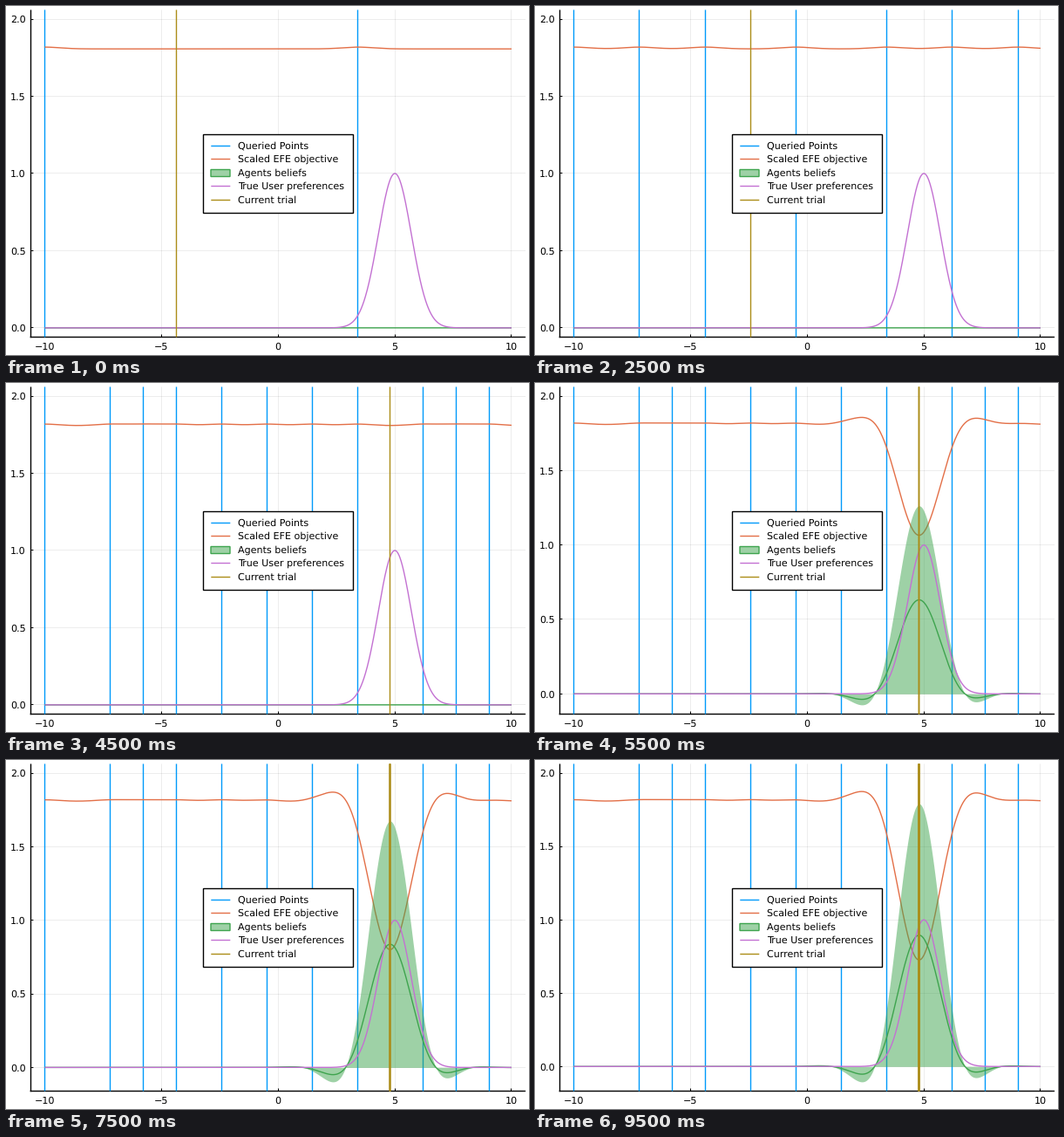
A matplotlib script for the animation above (10000 ms loop, 600 px wide and 400 px high).

```python
import math

import matplotlib.pyplot as plt
import numpy as np
from matplotlib.animation import FuncAnimation
from matplotlib.patches import Rectangle

WIDTH, HEIGHT, DPI = 600, 400, 100
LEFT, RIGHT, TOP, BOTTOM = 28.4, 596.06, 4.44, 379.5
BLUE, ORANGE, GREEN, PURPLE, GOLD = "#009afa", "#e36f47", "#3ea44e", "#c371d2", "#ac8d18"
FRAMES, INTERVAL = 20, 500

plt.rcParams.update({
    "font.family": "DejaVu Sans",
    "font.size": 8.06,
    "path.snap": False,
    "text.hinting": "none",
    "lines.linewidth": 1,
    "lines.solid_capstyle": "butt",
})

# Trial points in the order they are asked; the last one is asked repeatedly.
TRIALS = [-10, 3.41, -4.36, 9.04, -0.475, 6.2, -7.19, -2.415, 1.465, 7.62, -5.775, 4.793]
BEST = len(TRIALS) - 1
xs = np.linspace(-10, 10, 1001)
preference = np.exp(-(xs - 5) ** 2)
normal_cdf = np.vectorize(lambda z: 0.5 * (1 + math.erf(z / math.sqrt(2))))
nodes, weights = np.polynomial.hermite_e.hermegauss(20)
weights = weights / weights.sum()


def kernel(a, b):
    return np.exp(-0.5 * np.subtract.outer(a, b) ** 2)


def entropy(p):
    p = np.clip(p, 1e-9, 1 - 1e-9)
    return -p * np.log(p) - (1 - p) * np.log(1 - p)


def posterior(queried, answers):
    """Gaussian process regression with unit kernel and unit noise."""
    gram = kernel(queried, queried) + np.eye(len(queried))
    cross = kernel(xs, queried)
    gain = np.linalg.solve(gram, cross.T)
    return answers @ gain, 1 - np.sum(cross.T * gain, axis=0)


def efe_objective(mean, var):
    p = normal_cdf(mean / np.sqrt(1 + var))
    samples = normal_cdf(mean[:, None] + np.sqrt(var)[:, None] * nodes)
    information = entropy(p) - entropy(samples) @ weights
    return 1.838 - 3.64 * (p - 0.5) - 0.16 * information


def px(x):
    return LEFT + (np.asarray(x) + 10.6) / 21.2 * (RIGHT - LEFT)


def snap(v):
    """Centre of the pixel that holds v."""
    return math.floor(v) + 0.5


fig = plt.figure(figsize=(WIDTH / DPI, HEIGHT / DPI), dpi=DPI, facecolor="white")
ax = fig.add_axes([0, 0, 1, 1])


def hline(y, x0, x1, color="black", **style):
    ax.plot([x0, x1], [snap(y)] * 2, color=color, **style)


def vline(x, y0, y1, color="black", **style):
    ax.plot([snap(x)] * 2, [y0, y1], color=color, **style)


def draw_legend(left):
    ax.add_patch(Rectangle((left, 147.5), 172, 90, fc="white", ec="black", lw=1, zorder=5))
    entries = [("Queried Points", BLUE), ("Scaled EFE objective", ORANGE),
               ("Agents beliefs", GREEN), ("True User preferences", PURPLE),
               ("Current trial", GOLD)]
    for row, (label, color) in enumerate(entries):
        y = 160.1 + 15.6 * row
        x0, x1 = left + 8.8, left + 30.8
        if color == GREEN:
            box = (x0 - 0.3, snap(y) - 4), 22, 8
            ax.add_patch(Rectangle(*box, fc=GREEN, alpha=0.5, lw=0, zorder=6))
            ax.add_patch(Rectangle(*box, fill=False, ec=GREEN, lw=1, zorder=6))
        else:
            hline(y, x0, x1, color, zorder=6)
        ax.text(left + 39.2, y + 3.2, label, zorder=7)


def draw(i):
    ax.clear()
    ax.set(xlim=(0, WIDTH), ylim=(HEIGHT, 0))
    ax.axis("off")

    repeats = max(0, i + 2 - BEST)
    queried = np.array(TRIALS[:min(i + 2, BEST)] + [TRIALS[BEST]] * repeats)
    answers = (queried == TRIALS[BEST]).astype(float)
    mean, var = posterior(queried, answers)
    current = TRIALS[min(i + 2, BEST)]

    low = min(0, 2 * mean.min())
    pad = 0.03 * (2 - low)
    scale = (BOTTOM - TOP) / (2 - low + 2 * pad)

    def py(y):
        return BOTTOM - (np.asarray(y) - low + pad) * scale

    def curve(values, color, zorder):
        ax.plot(px(xs), py(values), color=color, zorder=zorder)

    grid = dict(alpha=0.1, lw=0.5, zorder=1)
    tick = dict(lw=0.75, zorder=1)
    for x in (-10, -5, 0, 5, 10):
        vline(px(x), TOP, BOTTOM, **grid)
        vline(px(x), BOTTOM, BOTTOM - 3, **tick)
        ax.text(px(x), 394, str(x).replace("-", "\u2212"), ha="center")
    for y in (0, 0.5, 1, 1.5, 2):
        hline(py(y), LEFT, RIGHT, **grid)
        hline(py(y), LEFT, LEFT + 3, **tick)
        ax.text(22.6, py(y) + 4.2, f"{y:.1f}", ha="right")
    vline(LEFT, TOP, BOTTOM + 0.7, zorder=1)
    hline(BOTTOM, LEFT - 0.7, RIGHT, zorder=1)

    for x in queried[answers == 0]:
        vline(px(x), TOP, BOTTOM, BLUE, zorder=2)
    curve(efe_objective(mean, var), ORANGE, 2.05)
    ax.fill_between(px(xs), py(0), py(2 * mean), color=GREEN, alpha=0.5, lw=0, zorder=2.1)
    curve(mean, GREEN, 2.2)
    curve(preference, PURPLE, 2.3)
    # Repeated strokes build up the soft edges of the line.
    for _ in range(repeats + 1):
        vline(px(current), TOP, BOTTOM, GOLD, zorder=2.4)

    draw_legend(33.5 if i in (6, 7) else 226.5)


anim = FuncAnimation(fig, draw, frames=FRAMES, interval=INTERVAL, init_func=lambda: None,
                     repeat=True, repeat_delay=0)
plt.show()
```
